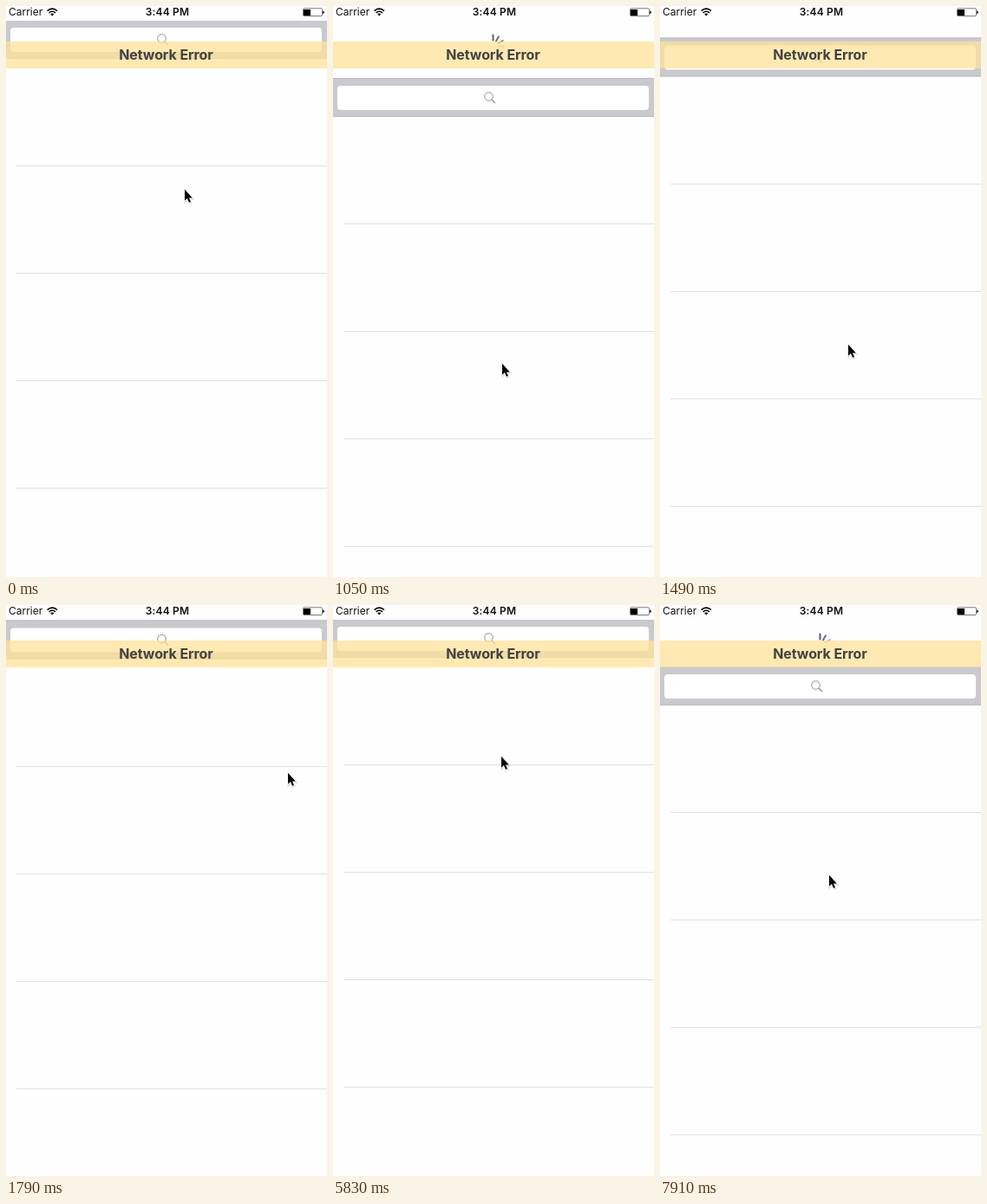
An HTML page for the animation above (8 s loop, 370x659 px).

```html
<!DOCTYPE html>
<html lang="en">
<head>
<meta charset="utf-8">
<title>Network error banner</title>
<style>
  html, body { margin: 0; width: 100%; height: 100%; overflow: hidden; background: #fefefe; }
  svg { display: block; }
  text { font-family: Inter, Roboto, sans-serif; }
</style>
</head>
<body>
<svg width="370" height="659" viewBox="0 0 370 659">
  <rect width="370" height="659" fill="#fefefe"/>

  <g id="spinner" transform="translate(184.5 46.5)" stroke="#5d5d6c" stroke-width="2" stroke-linecap="round"></g>

  <g id="bar">
    <rect y="16" width="370" height="45" fill="#c9c9ce"/>
    <path d="M0 16.5H370M0 60.5H370" stroke="#bcbcc1"/>
    <rect x="5" y="25" width="359" height="28" rx="4" fill="#fff"/>
    <g fill="none" stroke="#8e8e93">
      <circle cx="179.5" cy="37.5" r="4.8" stroke-width="1"/>
      <path d="M183 41L187 45" stroke-width="1.3"/>
    </g>
  </g>
  <path id="rows" d="M12 184.5H370m-358 124H370m-358 124H370m-358 124H370" fill="none" stroke="#e1e1e3"/>

  <rect y="41" width="370" height="31" fill="rgb(255,226,152)" fill-opacity=".75"/>
  <text x="184.5" y="62" font-size="16" font-weight="700" letter-spacing="-.1" text-anchor="middle" fill="#424242">Network Error</text>

  <rect width="370" height="17" fill="#fefefe"/>
  <text x="3" y="11" font-size="12" fill="#111">Carrier</text>
  <text x="186" y="11" font-size="12" font-weight="600" letter-spacing=".2" text-anchor="middle" fill="#111">3:44 PM</text>
  <g fill="none" stroke="#000" stroke-width="1.6">
    <path d="M47.6 5.6Q53.3 .7 59 5.6"/>
    <path d="M49.6 7.8Q53.3 4.7 57 7.8"/>
  </g>
  <path d="M51.2 9.2Q53.3 7.6 55.4 9.2L53.3 11.4Z"/>
  <rect x="342.5" y="2.8" width="22" height="8.8" rx="1.5" fill="none" stroke="#777"/>
  <rect x="343" y="4" width="8" height="7"/>
  <path d="M365 5.5q2 .2 2 1.7t-2 1.7z" fill="#333"/>

  <g id="cursor">
    <path d="M2 .8V13.8L4.9 11L7 15.8L9 15L7 10.4H10.9Z" transform="translate(.5 1)" stroke="#000" stroke-width="2" opacity=".14"/>
    <path d="M2 .8V13.8L4.9 11L7 15.8L9 15L7 10.4H10.9Z" stroke="#fff" stroke-width="1.6" stroke-linejoin="round" paint-order="stroke"/>
  </g>
</svg>
<script>
const LOOP = 8000;
const TICK = 148.4;          // the picture is refreshed once per tick
const SECOND_PULL = 5820;    // start of the second gesture, with its own ticks

const linear = u => u;
const easeIn = u => u * u;
const easeOut = u => 1 - (1 - u) ** 3;
const settle = u => 1 - (1 - u) ** 2.4;

// a cursor move from tick `start` to `end`; the cursor is hidden from tick `until`
const move = (start, end, from, to, easeX = linear, easeY = easeX, until = Infinity) =>
  ({ start, end, from, to, easeX, easeY, until });

const firstMoves = [
  move(0, 0, [204, 211], [204, 211]),
  move(5, 6, [204, 211], [193, 412], linear, linear, 9),
  move(10, 12, [215, 390], [323, 193]),
  move(12, 14, [323, 193], [257, 194], easeOut),
  move(14, 15, [257, 194], [275, 187], linear, linear, 16),
];
const secondMoves = [
  move(0, 3, [192, 174], [155, 188], settle, easeIn),
  move(9, 11, [155, 188], [193, 153], easeIn),
  move(12, 14, [193, 153], [193, 311], easeIn),
];

// pull down, hold with a slight sway, then spring back
function firstPull(tick) {
  if (tick < 6) return 0;
  if (tick <= 9) return 67 + (tick - 7) ** 2 / 2;
  return Math.max(0, 69 * Math.exp(-1.2 * (tick - 9)) - .4);
}
const secondPull = tick => tick < 14 ? 0 : 55;

const byId = id => document.getElementById(id);
const bar = byId('bar'), rows = byId('rows'), cursor = byId('cursor'), spinner = byId('spinner');

const spokes = [0, 1, 2, 3].map(i => {
  const spoke = document.createElementNS('http://www.w3.org/2000/svg', 'path');
  spoke.setAttribute('d', 'M0 -7V-13');
  spoke.setAttribute('transform', `rotate(${i * 30})`);
  return spinner.appendChild(spoke);
});

const clamp = u => Math.min(1, Math.max(0, u));
const moveTo = (node, x, y) => node.setAttribute('transform', `translate(${x} ${y})`);

function drawCursor(moves, tick) {
  const { start, end, from, to, easeX, easeY, until } = moves.findLast(m => m.start <= tick);
  const u = end > start ? clamp((tick - start) / (end - start)) : 1;
  const along = (axis, ease) => Math.round(from[axis] + (to[axis] - from[axis]) * ease(u));
  moveTo(cursor, along(0, easeX), along(1, easeY));
  cursor.style.display = tick < until ? '' : 'none';
}

function drawList(pull) {
  const snapped = Math.round(pull * 2) / 2;
  moveTo(bar, 0, snapped);
  moveTo(rows, 0, Math.round(snapped));

  // spokes fade in one after another as the list is pulled down
  const shown = (pull - 25) / 11.5;
  spokes.forEach((spoke, i) => {
    spoke.style.opacity = clamp(shown - i) * (1 - .12 * i);
  });
}

function draw(time) {
  const second = time >= SECOND_PULL;
  const tick = Math.floor((second ? time - SECOND_PULL : time) / TICK);
  drawList(second ? secondPull(tick) : firstPull(tick));
  drawCursor(second ? secondMoves : firstMoves, tick);
}

const start = performance.now();
function frame() {
  draw((performance.now() - start) % LOOP);
  requestAnimationFrame(frame);
}
frame();
</script>
</body>
</html>
```
